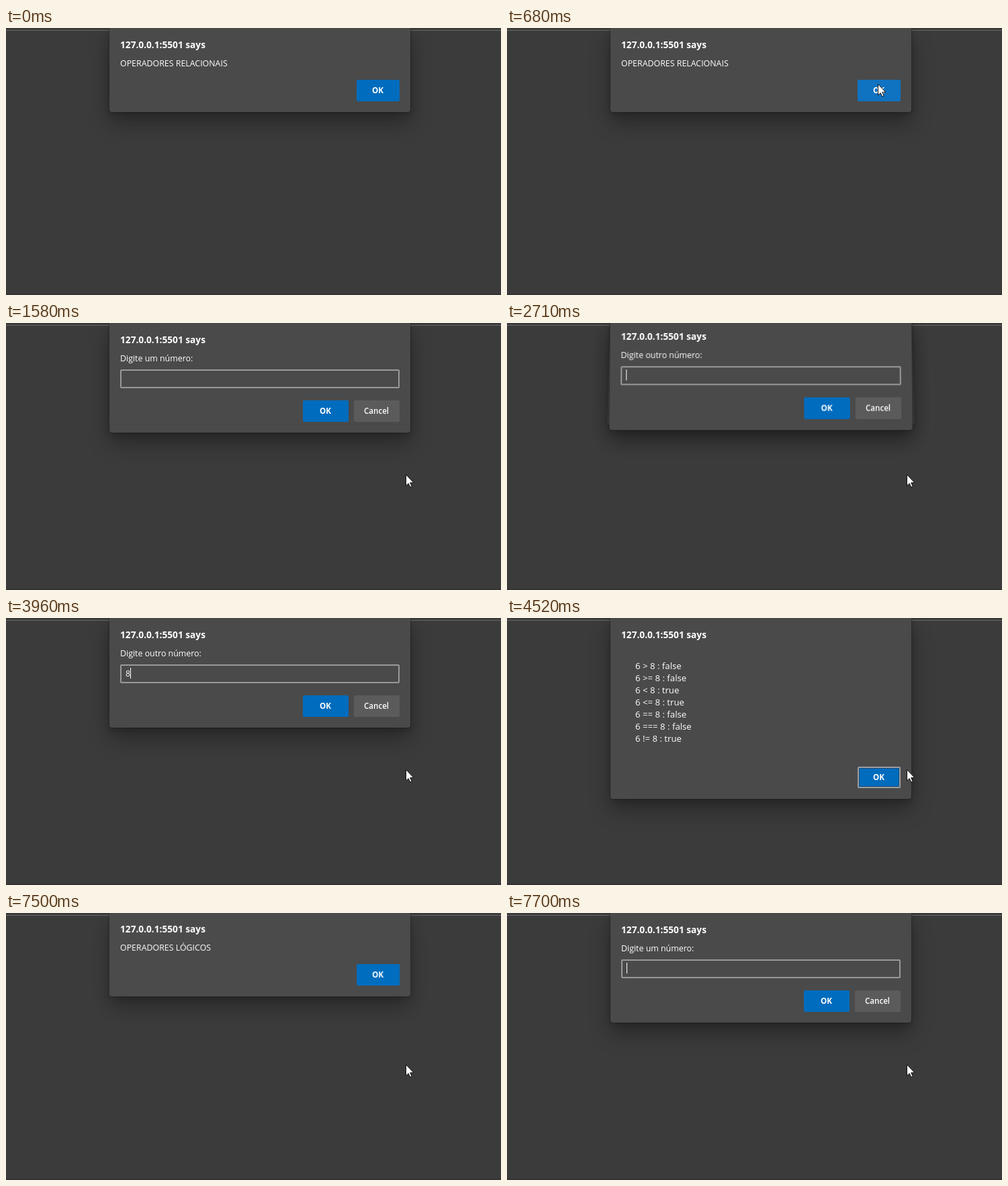
An HTML page that plays this animation: 737x397 px, repeating every 8000 ms.

```html
<!DOCTYPE html>
<html lang="pt">
<head>
<meta charset="utf-8">
<title>Operadores</title>
<style>
  html, body { margin: 0; width: 100%; height: 100%; overflow: hidden; background: #3b3b3b; }
  body { position: relative; color: #fff; font: 12.4px "Open Sans", "Noto Sans", sans-serif; }
  body * { position: absolute; box-sizing: border-box; }
  .rule { top: 3px; width: 100%; height: 1px; background: #696969; }
  .floor { bottom: 0; width: 100%; height: 2px; background: #353335; }
  .dialog {
    left: 154px; top: 0; width: 448px; background: #4a4a4a; border-radius: 0 0 4px 4px;
    transform-origin: 50% 0;
    box-shadow: 0 0 2px rgba(0,0,0,.55), 0 4px 10px rgba(0,0,0,.15), 0 16px 32px rgba(0,0,0,.32);
  }
  .title { left: 16px; top: 15px; font-size: 13.7px; font-weight: 700; line-height: 20px; white-space: pre; }
  .message { left: 16px; top: 43px; line-height: 20px; white-space: pre; }
  .lines { left: 37px; top: 62px; font-size: 13.2px; line-height: 18px; }
  .button {
    bottom: 16px; height: 32px; border-radius: 2px; background: #006cbe;
    font-size: 11.6px; font-weight: 700; line-height: 32px; text-align: center; padding-right: 1px;
  }
  .button.cancel { background: #5b5b5b; font-weight: 600; }
  .button.hover { background: #0f73c1; }
  .button.ring { box-shadow: inset 0 0 0 2px #999ea3, inset 0 0 0 3px #1f4a70; }
  .field { left: 16px; top: 69px; width: 416px; height: 28px; border: 2px solid #999; border-radius: 2px; }
  .typed { left: 6px; top: 2px; line-height: 20px; }
  .caret { top: 3px; width: 1px; height: 16px; background: #fff; }
  svg { overflow: visible; }
</style>
</head>
<body>
<div class="rule"></div>
<div class="floor"></div>
<svg id="pointer" width="1" height="1">
  <path id="arrow" d="M.5 .5V17L4.2 13.5 6.8 19 9.2 18 6.7 12.4H11.8Z" fill="#fff" stroke="#111"/>
  <g id="beam" fill="none">
    <path d="M-4-7.5H-1L0-6.5 1-7.5H4M0-6.5V6.5M-4 7.5H-1L0 6.5 1 7.5H4" stroke="#222" stroke-width="3"/>
    <path d="M-3.5-7.5H-1L0-6.5 1-7.5H3.5M0-6.5V6.5M-3.5 7.5H-1L0 6.5 1 7.5H3.5" stroke="#ddd"/>
  </g>
</svg>
<script>
const LOOP = 8000, SWAP = 180;

// The picture is refreshed only at these moments (ms).
const TICKS = [0, 200, 270, 340, 410, 480, 550, 680, 820, 890, 960, 1030, 1100, 1170, 1240, 1310,
  1380, 1510, 1580, 2040, 2310, 2570, 2640, 2710, 2780, 3110, 3700, 3960, 4310, 4380, 4450, 4520,
  6170, 6240, 6310, 7500, 7570, 7640, 7700];

// Pointer path: time, x, y
const PATH = [[200, 669, 316], [340, 605, 178], [480, 557, 75], [680, 552, 83], [890, 552, 91],
  [1170, 552, 91], [1310, 560, 120], [1510, 592, 217], [1580, 595, 225]];

const comparisons = [
  ['>', 6 > 8], ['>=', 6 >= 8], ['<', 6 < 8], ['<=', 6 <= 8],
  ['==', 6 == 8], ['===', 6 === 8], ['!=', 6 != 8]
].map(([op, result]) => `6 ${op} 8 : ${result}`).join('\n');

const DIALOGS = [
  { start: -SWAP, height: 125, text: 'OPERADORES RELACIONAIS' },
  { start: 954, height: 163, text: 'Digite um número:', value: '6', typedAt: 2310, blink: [1510, 2040] },
  { start: 2575, height: 163, text: 'Digite outro número:', value: '8', typedAt: 3960, blink: [3110, 3700] },
  { start: 4302, height: 269, text: comparisons, lines: true, ring: true },
  { start: 6121, height: 125, text: 'OPERADORES LÓGICOS', ring: true },
  { start: 7490, height: 163, text: 'Digite um número:', value: '', typedAt: LOOP, blink: [LOOP, LOOP] }
];

const pointer = document.getElementById('pointer');
const arrow = document.getElementById('arrow');
const beam = document.getElementById('beam');

function add(parent, className, text = '') {
  const el = document.createElement('div');
  el.className = className;
  el.textContent = text;
  parent.append(el);
  return el;
}

function addButton(parent, label, left, width, className = '') {
  const el = add(parent, 'button ' + className, label);
  el.style.left = left + 'px';
  el.style.width = width + 'px';
  return el;
}

DIALOGS.forEach((d, i) => {
  d.end = i + 1 < DIALOGS.length ? DIALOGS[i + 1].start : LOOP;
  d.el = add(document.body, 'dialog');
  d.el.style.height = d.height + 'px';
  add(d.el, 'title', '127.0.0.1:5501 says');
  add(d.el, d.lines ? 'message lines' : 'message', d.text);
  if (d.blink) {
    const field = add(d.el, 'field');
    d.typed = add(field, 'typed');
    d.caret = add(field, 'caret');
    d.ok = addButton(d.el, 'OK', 288, 68);
    addButton(d.el, 'Cancel', 364, 68, 'cancel');
  } else {
    d.ok = addButton(d.el, 'OK', 368, 64);
  }
});
document.body.append(pointer);

const clamp = v => Math.max(0, Math.min(1, v));
const smooth = v => v * v * (3 - 2 * v);
const fadeIn = v => smooth(clamp((v - 0.15) / 0.6));
const fadeOut = v => 1 - v ** 3;

function pointerAt(t) {
  const next = PATH.findIndex(p => p[0] > t);
  if (next < 0) return PATH[PATH.length - 1].slice(1);
  const [t0, x0, y0] = PATH[next - 1], [t1, x1, y1] = PATH[next];
  const k = (t - t0) / (t1 - t0);
  return [x0 + (x1 - x0) * k, y0 + (y1 - y0) * k];
}

function drawDialog(d, t) {
  const opening = clamp((t - d.start) / SWAP), closing = clamp((t - d.end) / SWAP);
  const visible = opening > 0 && closing < 1;
  d.el.style.display = visible ? '' : 'none';
  if (!visible) return;

  // Dialogs swing on their top edge while they fade.
  const tilt = closing || 1 - opening;
  d.el.style.opacity = closing ? fadeOut(closing) : fadeIn(opening);
  d.el.style.transform = tilt
    ? `translateY(${-20 * tilt}px) perspective(500px) rotateX(${5 * tilt}deg)` : 'none';
  d.ok.classList.toggle('ring', !!d.ring && !closing);

  if (d.blink) {
    const typed = t >= d.typedAt;
    d.typed.textContent = typed ? d.value : '';
    d.caret.style.left = (typed ? 13 : 6) + 'px';
    d.caret.style.display = t >= d.blink[0] && t < d.blink[1] ? 'none' : '';
  }
}

function drawPointer(t) {
  const shown = t >= PATH[0][0];
  const [x, y] = shown ? pointerAt(t).map(Math.round) : [0, 0];
  const overField = t >= 960 && y < 97;
  const overButton = t < 960 && x >= 522 && x < 586 && y >= 77 && y < 109;
  pointer.style.display = shown ? '' : 'none';
  pointer.style.left = x + 'px';
  pointer.style.top = y + 'px';
  beam.style.display = overField ? '' : 'none';
  arrow.style.display = overField ? 'none' : '';
  DIALOGS[0].ok.classList.toggle('hover', overButton);
}

function frame() {
  const now = performance.now() % LOOP;
  const t = TICKS.filter(tick => tick <= now).pop();
  DIALOGS.forEach(d => drawDialog(d, t));
  drawPointer(t);
  requestAnimationFrame(frame);
}
frame();
</script>
</body>
</html>
```
